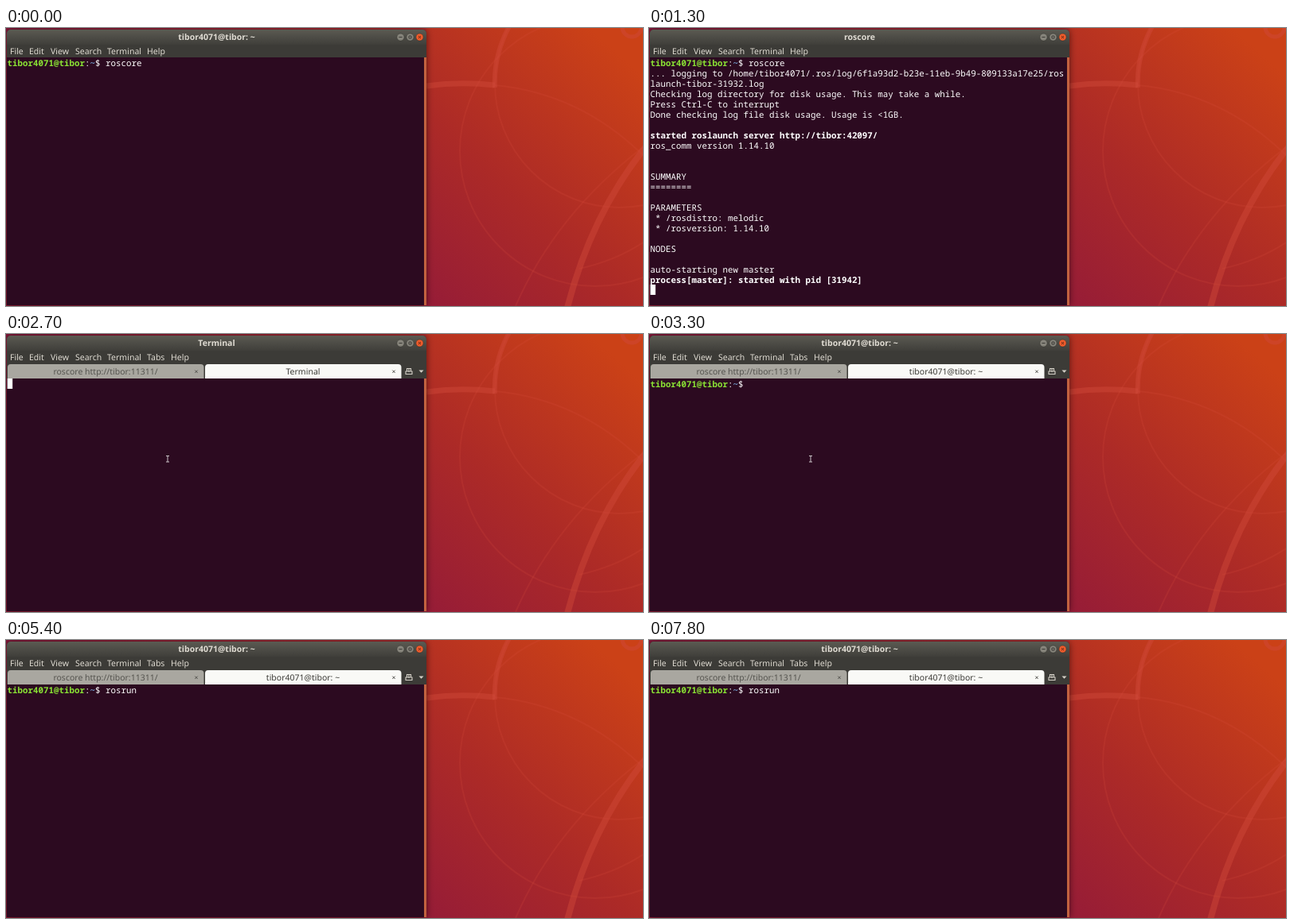
An HTML page with a canvas for the animation above (8000 ms loop, 800 px wide and 350 px high).

```html
<!DOCTYPE html>
<html lang="en">
<head>
<meta charset="utf-8">
<title>Terminal</title>
<style>
  html, body { margin: 0; width: 100%; height: 100%; overflow: hidden; }
  #stage { position: relative; width: 800px; height: 350px; overflow: hidden; text-rendering: geometricPrecision; }
  canvas { position: absolute; left: 0; top: 0; }
  .label {
    position: absolute; line-height: 20px; white-space: pre; color: #dfdbd2;
    font-family: "Noto Sans", "Open Sans", sans-serif; font-size: 10.5px;
  }
  .mid { transform: translateX(-50%); }
  .title { font-weight: bold; }
  .back { color: #55544f; }
  .front { color: #3c3b37; }
  #text {
    position: absolute; left: 1.5px; margin: 0; color: #fff; line-height: 13px;
    font-family: "Noto Sans Mono", "DejaVu Sans Mono", monospace; font-size: 10.8333px;
    font-weight: 500; font-variant-ligatures: none;
  }
  #text b { font-weight: 700; }
  .user { color: #8ae234; }
  .path { color: #729fcf; }
</style>
</head>
<body>
<div id="stage">
  <canvas id="view" width="800" height="350"></canvas>
  <div id="labels"></div>
  <pre id="text"></pre>
</div>
<script>
const ctx = document.getElementById('view').getContext('2d');
const labels = document.getElementById('labels');
const text = document.getElementById('text');

const LOOP = 8000, CELL = 6.5, ROW = 13, ROWS = 24, BOTTOM = 349;
const HOST = 'tibor', USER = 'tibor4071';
const HOME = `${USER}@${HOST}: ~`;
const CORE = `roscore http://${HOST}:11311/`;
const PROMPT = `<b class="user">${USER}@${HOST}</b>:<b class="path">~</b>$ `;
const PROMPT_LEN = 19;
const RUN_ID = '6f1a93d2-b23e-11eb-9b49-809133a17e25';

// A leading "!" marks a bold line.
const LOG = [
  `... logging to /home/${USER}/.ros/log/${RUN_ID}/ros`,
  `launch-${HOST}-31932.log`,
  'Checking log directory for disk usage. This may take a while.',
  'Press Ctrl-C to interrupt',
  'Done checking log file disk usage. Usage is &lt;1GB.',
  '',
  `!started roslaunch server http://${HOST}:42097/`,
  'ros_comm version 1.14.10',
  '', '',
  'SUMMARY',
  '========',
  '',
  'PARAMETERS',
  ' * /rosdistro: melodic',
  ' * /rosversion: 1.14.10',
  '',
  'NODES',
  '',
  'auto-starting new master',
  '!process[master]: started with pid [31942]',
  `!ROS_MASTER_URI=http://${HOST}:11311/`,
  '',
  `!setting /run_id to ${RUN_ID}`,
  '!process[rosout-1]: started with pid [31953]',
  'started core service [/rosout]'
];

// [time, value] steps
const PRINTED = [[0, 0], [1100, 6], [1200, 20], [1300, 21], [1500, 24], [1600, 26]];
const TYPED = [[0, ''], [4000, 'r'], [4200, 'ros'], [4400, 'rosr'], [4500, 'rosru'], [4700, 'rosrun'], [4800, 'rosrun ']];
const TITLE = [[0, HOME], [1100, 'roscore'], [1500, CORE], [2700, 'Terminal'], [2800, HOME]];
const CURSOR = [[0, false], [200, true], [800, false], [900, true], [1500, false], [2100, true],
  [3300, false], [3900, true], [5400, false], [6000, true], [6600, false], [7200, true], [7800, false]];

function at(steps, t) {
  let value = steps[0][1];
  for (const [time, v] of steps) if (t >= time) value = v;
  return value;
}

function stateAt(t) {
  const tabs = t >= 2700;
  let rows, col;
  if (tabs) {
    const typed = at(TYPED, t), ready = t >= 2800;
    rows = [ready ? PROMPT + typed : ''];
    col = ready ? PROMPT_LEN + typed.length : 0;
  } else {
    rows = [PROMPT + 'roscore'];
    col = PROMPT_LEN + 7;
    if (t >= 900) {
      const lines = LOG.slice(0, at(PRINTED, t));
      rows.push(...lines.map(s => s[0] === '!' ? `<b>${s.slice(1)}</b>` : s), '');
      col = 0;
    }
  }
  const hidden = Math.max(0, rows.length - ROWS);
  return {
    tabs, col, hidden, total: rows.length, rows: rows.slice(hidden),
    title: at(TITLE, t), cursor: at(CURSOR, t), pointer: tabs && t < 4000
  };
}

function rect(color, x, y, w, h) {
  ctx.fillStyle = color;
  ctx.fillRect(x, y, w, h);
}

function stroke(color, width, path) {
  ctx.strokeStyle = color;
  ctx.lineWidth = width;
  ctx.stroke(new Path2D(path));
}

function ring(color, width, x, y, r) {
  ctx.strokeStyle = color;
  ctx.lineWidth = width;
  ctx.beginPath();
  ctx.arc(x, y, r, 0, 7);
  ctx.stroke();
}

function topRounded(fill, x, y, w, h, r) {
  ctx.fillStyle = fill;
  ctx.beginPath();
  ctx.roundRect(x, y, w, h, [r, r, 0, 0]);
  ctx.fill();
}

function drawDesktop() {
  const g = ctx.createLinearGradient(545, 365, 815, 75);
  g.addColorStop(0, '#961c37');
  g.addColorStop(0.45, '#ac2a27');
  g.addColorStop(1, '#cb4117');
  rect(g, 0, 0, 800, 350);
  const top = ctx.createLinearGradient(0, 0, 528, 0);
  top.addColorStop(0, '#85173a');
  top.addColorStop(1, '#b12c2c');
  rect(top, 0, 0, 528, 8);

  const thin = 'rgba(215,80,62,0.18)', thick = 'rgba(207,72,58,0.46)';
  ring(thin, 2, 740, 155, 170);
  ring(thin, 2, 770, 70, 156);
  stroke(thin, 2, 'M614 72 Q720 82 800 160');
  stroke(thin, 2, 'M640 350 Q690 235 800 150');
  stroke(thin, 2, 'M720 303 Q765 293 800 270');
  stroke(thick, 7, 'M528 73 Q570 67 614 72');
  stroke(thick, 6, 'M614 75 Q612 35 632 -2');
  stroke(thick, 8, 'M705 352 Q735 235 803 150');
  ring(thick, 5, 786, -1, 12);
}

function drawButton(x, fill) {
  ctx.fillStyle = fill;
  ctx.beginPath();
  ctx.arc(x, 11.5, 4.6, 0, 7);
  ctx.fill();
  ring('rgba(45,44,40,0.6)', 0.7, x, 11.5, 4.6);
}

function drawFrame() {
  ctx.save();
  ctx.shadowColor = 'rgba(0,0,0,0.55)';
  ctx.shadowBlur = 9;
  topRounded('#3c3b37', 1, 2, 527, BOTTOM - 2, 5);
  ctx.restore();
  const bar = ctx.createLinearGradient(0, 2, 0, 22);
  bar.addColorStop(0, '#5b5a52');
  bar.addColorStop(1, '#3e3d39');
  topRounded(bar, 1, 2, 527, 20, 5);
  rect('#3c3b37', 1, 21, 527, 16);
  drawButton(495.5, '#85837a');
  drawButton(507.5, '#85837a');
  drawButton(519.5, '#ec5b2c');
  stroke('#3c3b37', 1, 'M493.5 11.5h4 M506 10h3v3h-3z');
  stroke('#5a2413', 1, 'M518 10l3 3m0 -3l-3 3');
}

function drawTabs() {
  topRounded('#a9a7a0', 2, 38, 246.5, 18, 4);
  topRounded('#f9f9f6', 250, 38, 246.5, 18, 4);
  for (const x of [239, 487]) stroke('#55544f', 1, `M${x - 1.7} 45.6l3.4 3.4m0 -3.4l-3.4 3.4`);
  stroke('#d5d1c8', 1.1, 'M502 50.5v-3.5h8v3.5z M503.5 46.5v-3h5v3 M506 44v4');
  ctx.fillStyle = '#d5d1c8';
  ctx.fill(new Path2D('M518.5 45.5h6l-3 3.2z'));
}

function draw(s) {
  const top = s.tabs ? 56 : 37, height = BOTTOM - top;
  drawDesktop();
  drawFrame();
  if (s.tabs) drawTabs();
  rect('#2c0a20', 1, top, 527, height);
  const thumb = top + height * s.hidden / s.total;
  rect('#c2623f', 525, thumb, 3, BOTTOM - thumb);
  if (s.cursor) rect('#ffffff', 1.7 + s.col * CELL, top + (s.rows.length - 1) * ROW, CELL, ROW);
  if (s.pointer) stroke('#c9c2c7', 1, 'M201 153.5h4 M203 153.5v7.5 M201 161h4');

  const label = (x, y, str, cls = '') => `<span class="label ${cls}" style="left:${x}px;top:${y}px">${str}</span>`;
  const menu = [[5, 'File'], [29, 'Edit'], [56, 'View'], [87, 'Search'], [127, 'Terminal'],
    ...(s.tabs ? [[177, 'Tabs'], [207, 'Help']] : [[177, 'Help']])];
  labels.innerHTML = label(264.5, 2, s.title, 'mid title') +
    menu.map(([x, str]) => label(x, 20, str)).join('') +
    (s.tabs ? label(125, 38, CORE, 'mid back') + label(373, 38, s.title, 'mid front') : '');
  text.style.top = top + 1 + 'px';
  text.innerHTML = s.rows.join('\n');
}

const start = performance.now();
let shown = '';
function tick() {
  const state = stateAt((performance.now() - start) % LOOP);
  const key = JSON.stringify(state);
  if (key !== shown) {
    shown = key;
    draw(state);
  }
  requestAnimationFrame(tick);
}
tick();
</script>
</body>
</html>
```
